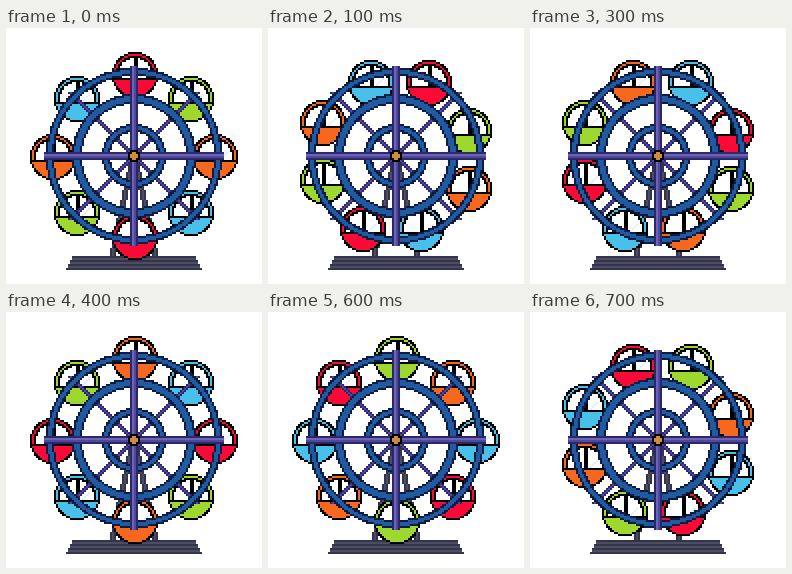
Write an HTML page with a canvas that moves like this. It is 256 px wide and 256 px high and loops after 800 ms.

```html
<!DOCTYPE html>
<html lang="en">
<head>
<meta charset="utf-8">
<title>Ferris wheel</title>
<style>
html, body { margin: 0; width: 100%; height: 100%; overflow: hidden; background: #fff; }
canvas { display: block; width: 256px; height: 256px; image-rendering: pixelated; }
</style>
</head>
<body>
<canvas id="stage" width="128" height="128"></canvas>
<script>
const SIZE = 128, MID = 64, STEP = 100, STEPS = 8;
const INK = '#000', NAVY = '#0c1c44', BLUE = '#215a9e';
const SHADE = '#2b2768', PURPLE = '#4f499c', SHINE = '#6b64b8';
const STEEL = '#4c4d63', SLATE = '#33344a';
const CABINS = ['#fb0a38', '#9ed82e', '#f7681e', '#48c0ea'];

const stage = document.getElementById('stage').getContext('2d');

function layer(draw) {
  const canvas = document.createElement('canvas');
  canvas.width = canvas.height = SIZE;
  draw(canvas.getContext('2d'));
  return canvas;
}

function box(g, x, y, w, h, color) {
  g.fillStyle = color;
  g.fillRect(x, y, w, h);
}

// Fills whole cells whose middle lies between two radii, from row `top` down.
function ring(g, cx, cy, inner, outer, color, top = -outer) {
  g.fillStyle = color;
  for (let y = Math.floor(cy - outer); y < cy + outer; y++) {
    if (y + 0.5 < cy + top) continue;
    for (let x = Math.floor(cx - outer); x < cx + outer; x++) {
      const d = Math.hypot(x + 0.5 - cx, y + 0.5 - cy);
      if (d >= inner && d < outer) g.fillRect(x, y, 1, 1);
    }
  }
}

function disc(g, cx, cy, r, color, top) {
  ring(g, cx, cy, 0, r, color, top);
}

function rim(g, inner, outer) {
  ring(g, MID, MID, inner, outer, NAVY);
  ring(g, MID, MID, inner + 1, outer - 1, BLUE);
}

const stand = layer(g => {
  for (let y = 64; y < 115; y++) {
    const spread = Math.round((y - 64) * 0.21);
    for (const x of [62 - spread, 63 + spread]) {
      box(g, x, y, 3, 1, SLATE);
      box(g, x + 1, y, 1, 1, STEEL);
    }
  }
  for (let i = 0; i < 7; i++) {
    const x = 33 - (i >> 1);
    box(g, x, 114 + i, SIZE - 2 * x, 1, i % 2 ? STEEL : SLATE);
  }
});

const wheel = layer(g => {
  for (const [dx, w, color] of [[-1, 3, SHADE], [0, 1, PURPLE]]) {
    for (let i = -32; i < 32; i++) {
      box(g, 64 + i + dx, 64 + i, w, 1, color);
      box(g, 63 - i + dx, 64 + i, w, 1, color);
    }
  }
  rim(g, 40, 44);
  rim(g, 26, 31);
  rim(g, 12, 16);
  const tones = [SHADE, SHINE, PURPLE, SHADE];
  tones.forEach((tone, i) => box(g, 62 + i, 19, 1, 90, tone));
  tones.forEach((tone, i) => box(g, 19, 62 + i, 90, 1, tone));
  disc(g, MID, MID, 3, INK);
  disc(g, MID, MID, 2, '#d08c38');
});

function cabin(cx, cy, color) {
  disc(stage, cx, cy, 11.5, INK);
  disc(stage, cx, cy, 10.5, color);
  disc(stage, cx, cy, 9.5, INK);
  disc(stage, cx, cy, 8.5, '#fff');
  for (let i = 0; i < 4; i++) {
    box(stage, cx + 5.5 - i, cy - 2.5 + i, 1, 1, '#e4ecfa');
  }
  box(stage, cx - 0.5, cy - 8.5, 2, 11, INK);
  disc(stage, cx, cy, 10.5, INK, 2);
  disc(stage, cx, cy, 10.5, color, 3);
}

// Cabins rest either on the spokes or between them.
function seat(i, between) {
  const quarter = (i >> 1) * Math.PI / 2;
  const [x, y] = between
    ? (i % 2 ? [36.6, -12.9] : [16.3, -36.6])
    : (i % 2 ? [28.3, -28.3] : [0, -40.4]);
  const c = Math.round(Math.cos(quarter)), s = Math.round(Math.sin(quarter));
  return [x * c - y * s, x * s + y * c].map(v => Math.floor(MID + v) + 0.5);
}

function render(step) {
  box(stage, 0, 0, SIZE, SIZE, '#fff');
  stage.drawImage(stand, 0, 0);
  const turns = step >> 1;
  for (let i = 0; i < 8; i++) {
    const [x, y] = seat((i + turns) % 8, step % 2);
    cabin(x, y, CABINS[i % 4]);
  }
  stage.drawImage(wheel, 0, 0);
}

let shown = -1;
function tick(now) {
  const step = Math.floor(now / STEP) % STEPS;
  if (step !== shown) render(shown = step);
  requestAnimationFrame(tick);
}
render(0);
requestAnimationFrame(tick);
</script>
</body>
</html>
```
